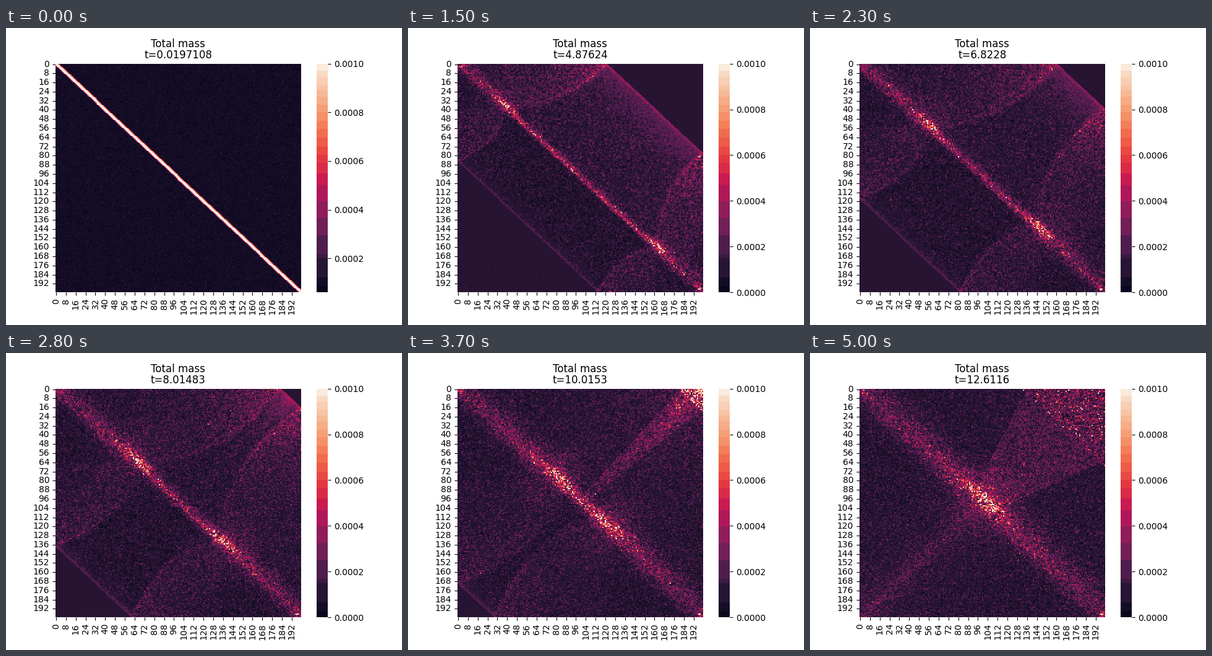
A matplotlib script for the animation above (5100 ms loop, 640 px wide and 480 px high).

```python
import numpy as np
import matplotlib.pyplot as plt
from matplotlib.animation import FuncAnimation
from matplotlib.colors import LinearSegmentedColormap, ListedColormap
from matplotlib.ticker import MultipleLocator

N = 200
FRAMES = 51
INTERVAL = 100

# Motion of the main features, keyed by step
STEPS = np.array([0, 7, 15, 23, 32, 43, 50])
TIME = [0.0197108, 2.70193, 4.87624, 6.8228, 8.93539, 11.2426, 12.6116]
UPPER = [2, 73, 121, 160, 199, 240, 267]
LOWER = [2, 50, 85, 118, 152, 190, 212]
FOCUS = [0, 18, 38, 55, 73, 91, 100]


def track(values, k):
    """Cubic Hermite curve through the keyed values."""
    values = np.array(values, float)
    slopes = np.gradient(values, STEPS)
    i = min(np.searchsorted(STEPS, k, side="right") - 1, len(STEPS) - 2)
    span = STEPS[i + 1] - STEPS[i]
    s = (k - STEPS[i]) / span
    return ((1 + 2 * s) * (1 - s) ** 2 * values[i]
            + s * (1 - s) ** 2 * span * slopes[i]
            + s * s * (3 - 2 * s) * values[i + 1]
            + s * s * (s - 1) * span * slopes[i + 1])


def banded_map():
    stops = [(0, "#03051a"), (0.045, "#160d26"), (0.1, "#251432"),
             (1 / 7, "#35193e"), (0.2, "#4c1d4b"), (2 / 7, "#701f57"),
             (0.4, "#a11a5b"), (3 / 7, "#ad1759"), (0.5, "#cb1b4f"),
             (4 / 7, "#e13342"), (0.6, "#e83f3f"), (5 / 7, "#f37651"),
             (0.8, "#f69c73"), (6 / 7, "#f6b48f"), (1, "#faebdd")]
    smooth = LinearSegmentedColormap.from_list("smooth", stops)
    edges = np.array([0, 10, 24, 55, 62, 92, 120, 147, 174, 192, 210, 222,
                      236, 250, 264, 278, 292, 304, 316, 326, 336, 348, 358,
                      370]) / 370
    mids = (edges[:-1] + edges[1:]) / 2
    mids[-1] = 1
    level = (np.arange(256) + 0.5) / 256
    return ListedColormap(smooth(mids[np.searchsorted(edges, level) - 1]))


row, col = np.mgrid[0:N, 0:N].astype(float)
off = col - row
dist = abs(off)
above = off >= 0

# The field is symmetric about the anti-diagonal: fold onto one half
flip = col + row > N - 1
p = np.where(flip, N - 1 - row, col)
q = np.where(flip, N - 1 - col, row)
along = (p + q) / 2
fold = N - 1 - (p + q)
far, near = np.maximum(p, q), np.minimum(p, q)


def bump(x, width):
    return np.exp(-(x / width) ** 2)


def arc_height(front, focus):
    """Curve from the focus on the diagonal to the front on the edge."""
    v = np.clip((far - focus) / (front - focus), 0, 1)
    t = (1.2 - np.sqrt(1.44 - 0.8 * v)) / 0.4
    return focus * (1 - t * t)


def wave(front, focus, base, glow, reach, edge, width):
    """Mean level behind a front that moves away from the diagonal."""
    depth = front - dist
    body = base + glow * np.exp(-np.clip(depth, 0, None) / reach)
    arc = arc_height(front, focus)
    inside = (near < arc) & (far < front) & (far > focus)
    tip = np.exp(-np.clip(front - far, 0, None) / 35)
    body = np.where(inside, 1.1e-4 + 1.3 * glow * tip, body)
    body += edge * bump(near - arc, width) * (far > focus) * (0.25 + tip)
    body += edge * bump(depth, width) * (near >= arc)
    return np.where(depth > -1, body, 1e-4), depth, inside


def streaks(rng):
    """Short alternating dashes along rows and columns."""
    wide = np.repeat(rng.normal(size=(N, N // 2)), 2, axis=1)
    tall = np.repeat(rng.normal(size=(N // 2, N)), 2, axis=0)
    return (-1) ** row * wide + (-1) ** col * tall


def field(k):
    rng = np.random.default_rng(100 + k)
    calm = 1e-4 * (1 + 0.12 * rng.normal(size=(N, N)))
    if k == 0:
        calm = np.clip(calm, 6e-5, None)
        calm[dist <= 1] = 1.2e-3
        calm[off == 2] = 6.5e-4
        calm[off == -2] = 4e-4
        return calm

    upper, lower, focus = (track(v, k) for v in (UPPER, LOWER, FOCUS))
    fade = 1 / (1 + k / 30)
    width = 1.5 + 0.05 * k
    up, up_depth, up_fan = wave(upper, focus, 1.05e-4, 1.6e-4, 28,
                                1.5e-4 * fade, width)
    low, low_depth, low_fan = wave(lower, focus, 0.85e-4 + 4e-7 * k,
                                   0.5e-4, 8, 1e-4 * fade, width)
    up += 1e-4 * np.exp(-dist / 45 - k / 14) * (up_depth > 0)
    mean = np.where(above, up, low)
    depth = np.where(above, up_depth, low_depth)
    fan = np.where(above, up_fan, low_fan)

    # Diagonal ridge, narrow ahead of the focus and broad behind it
    side = np.where(above, 1.25, 0.75)
    ahead = ((2.2e-4 + 1e-3 * np.exp(-k / 5))
             * bump(dist, side * (0.5 + 0.2 * k)))
    behind = (1.9e-4 * (0.6 + 0.6 * along / focus)
              * bump(dist, side * (4 + 0.25 * k)))
    blend = 1 / (1 + np.exp(-(along - focus) / (1 + 0.1 * k)))
    ridge = blend * ahead + (1 - blend) * behind
    ridge += 3.6e-4 * (bump(along - focus, 3 + 0.24 * k)
                       * bump(off - 2 - 0.07 * k, 2.5 + 0.1 * k))
    ridge += 1.5e-4 * bump(np.hypot(p - 2, q - 2), 4)
    mean = mean + ridge

    # Side lobes that follow the focus
    lobe = bump(along - focus + 6, 16) * bump(dist - 22, 20)
    mean += 0.55e-4 * min(k / 40, 1) * lobe

    # Fans meet on the anti-diagonal and run back from the corner
    corner = bump(fold, 8) * np.exp(-(N - 1 - off) / 50)
    mean += 7e-4 * bump(upper - 201, 15) * corner * above
    past = upper - (N - 1)
    rebound = np.zeros((N, N), bool)
    if past > 0:
        back = N - 1 - past
        rebound = off > back
        wedge = fold < 0.9 * past * (0.25 + 0.75 * off / back)
        mean += 0.75e-4 * (wedge & above & ~rebound)
        mean += 4.8e-4 * np.exp(-past / 55) * rebound
    mean += (0.8e-4 * bump(lower - 208, 16) * ~above
             * np.exp(-fold / (4 + 0.1 * k)))

    # Roughness grows behind the fronts
    scale = np.where(above, 38, 9)
    rough = 0.08 + 0.32 * (1 - np.exp(-np.clip(depth, 0, None) / scale))
    rough = np.where(fan, 0.36, rough)
    rough = np.where(rebound, 0.5, rough)
    rough = np.maximum(rough, 0.48 * np.clip(ridge / 4e-4, 0, 1))
    noisy = mean * rng.gamma(1 / rough ** 2) * rough ** 2
    noisy *= np.clip(1 + 0.4 * rough * streaks(rng), 0.05, 2)
    data = np.where(depth > -1, noisy, calm)
    data[197, 196:198] = 1e-3
    return data


fig = plt.figure(figsize=(6.4, 4.8), dpi=100)
ax = fig.add_subplot()
image = ax.imshow(field(0), cmap=banded_map(), vmin=6e-5, vmax=1e-3,
                  extent=(0, N, N, 0), aspect="auto",
                  interpolation="nearest")
bar = fig.colorbar(image, ax=ax, ticks=MultipleLocator(2e-4), format="%.4f")
bar.outline.set_linewidth(0)
ax.spines[:].set_visible(False)
labels = np.arange(0, N, 8)
ax.set_xticks(labels + 0.5, labels, rotation=90)
ax.set_yticks(labels + 0.5, labels, va="center")
title = ax.set_title("", linespacing=1.0)


def update(k):
    image.set_data(field(k))
    image.set_clim(6e-5 if k == 0 else 0, 1e-3)
    title.set_text(f"Total mass\nt={track(TIME, k):.6g}")
    return image, title


anim = FuncAnimation(fig, update, frames=FRAMES, interval=INTERVAL,
                     repeat=True, repeat_delay=0, blit=False)
plt.show()
```
